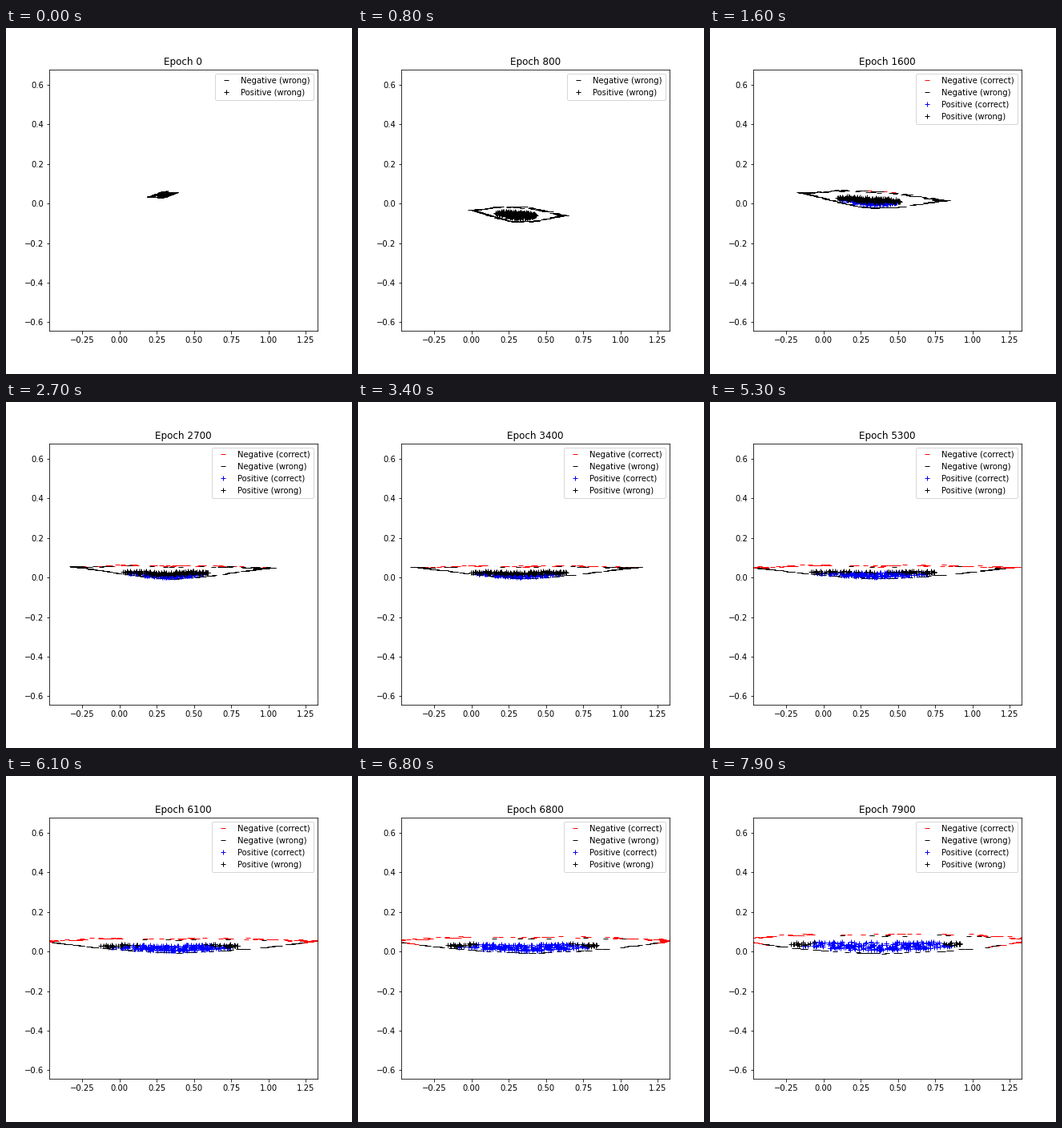
These frames come from a looping animation (432 px wide and 432 px high, 8 s). A matplotlib script:

```python
import numpy as np
import matplotlib.pyplot as plt
from matplotlib.animation import FuncAnimation

FRAMES, STEP = 80, 100
rng = np.random.default_rng(4)


def sample(radius):
    angle = rng.uniform(0, 2 * np.pi, len(radius))
    return radius * np.cos(angle), radius * np.sin(angle)


# Negatives form a ring, positives a disc inside it.
neg = sample(rng.uniform(0.85, 1.0, 240))
pos = sample(0.43 * np.sqrt(rng.random(260)))


def embed(points, t):
    """Stretch the cloud sideways while it dips, tilts and bends into a bowl."""
    u, v = points
    grow = 1 - np.exp(-t / 30)
    bump = np.exp(-((t - 14) / 9) ** 2)
    bowl = min(t / 25, 1)
    late = (max(t - 42, 0) / 37) ** 2

    width = 0.09 + 1.01 * grow
    squash = max(t - 30, 1) / 40
    x = 0.29 + 0.0008 * t + 0.08 * grow * (u**2 + v**2)
    x = x + width * np.tanh(squash * u) / np.tanh(squash)

    dip = 0.12 * (t / 5 * np.exp(1 - t / 5)) ** 4
    base = 0.012 + 0.034 * np.exp(-t / 2) - dip + 0.012 * late
    tilt = 0.013 * np.exp(-t / 2) - 0.022 * bump
    lean = 0.01 + 0.022 * min(t / 8, 1) + 0.012 * bump + 0.018 * late
    y = base + tilt * u + lean * v * (1 - u**2)
    y = y + bowl * (0.042 * np.abs(u) ** 1.2 + 0.015 * v**2)
    return x, y


def progress(t):
    return max(t - 16, 0) / 63


def neg_correct(t):
    u, v = neg
    w = progress(t)
    score = w * u**2 + (1 - 0.8 * w) * v + 3 * (np.hypot(u, v) - 0.92)
    return score > 0.22 + 0.93 * np.exp((16 - t) / 17)


def pos_correct(t):
    u, v = pos
    w = progress(t)
    score = 4 * w * u**2 + (1 - 0.6 * w) * v
    return score < 0.55 * w - 0.1 - 0.05 * max(16 - t, 0)


fig = plt.figure(figsize=(6, 6), dpi=72, facecolor="white")
fig.subplots_adjust(left=0.125, right=0.9, bottom=0.125, top=0.88)
ax = fig.add_subplot()
ax.set_xlim(-0.472, 1.328)
ax.set_ylim(-0.643, 0.6776)
ax.set_xticks(np.arange(-0.25, 1.3, 0.25))
ax.set_yticks(np.arange(-3, 4) * 0.2)
ax.xaxis.set_major_formatter("{x:.2f}")
ax.yaxis.set_major_formatter("{x:.1f}")
title = ax.set_title("Epoch 0")


def series(label, marker, color):
    return ax.plot([], [], marker, color=color, label=label)[0]


lines = [
    series("Negative (correct)", "_", "red"),
    series("Negative (wrong)", "_", "black"),
    series("Positive (correct)", "+", "blue"),
    series("Positive (wrong)", "+", "black"),
]


def update(i):
    masks = []
    for points, ok in ((neg, neg_correct(i)), (pos, pos_correct(i))):
        x, y = embed(points, i)
        for mask in (ok, ~ok):
            lines[len(masks)].set_data(x[mask], y[mask])
            masks.append(mask)
    shown = [line for line, mask in zip(lines, masks) if mask.any()]
    ax.legend(handles=shown, loc="upper right")
    title.set_text(f"Epoch {i * STEP}")
    return lines


anim = FuncAnimation(fig, update, frames=FRAMES, interval=100,
                     init_func=lambda: update(0), repeat=True, repeat_delay=0)
plt.show()
```
